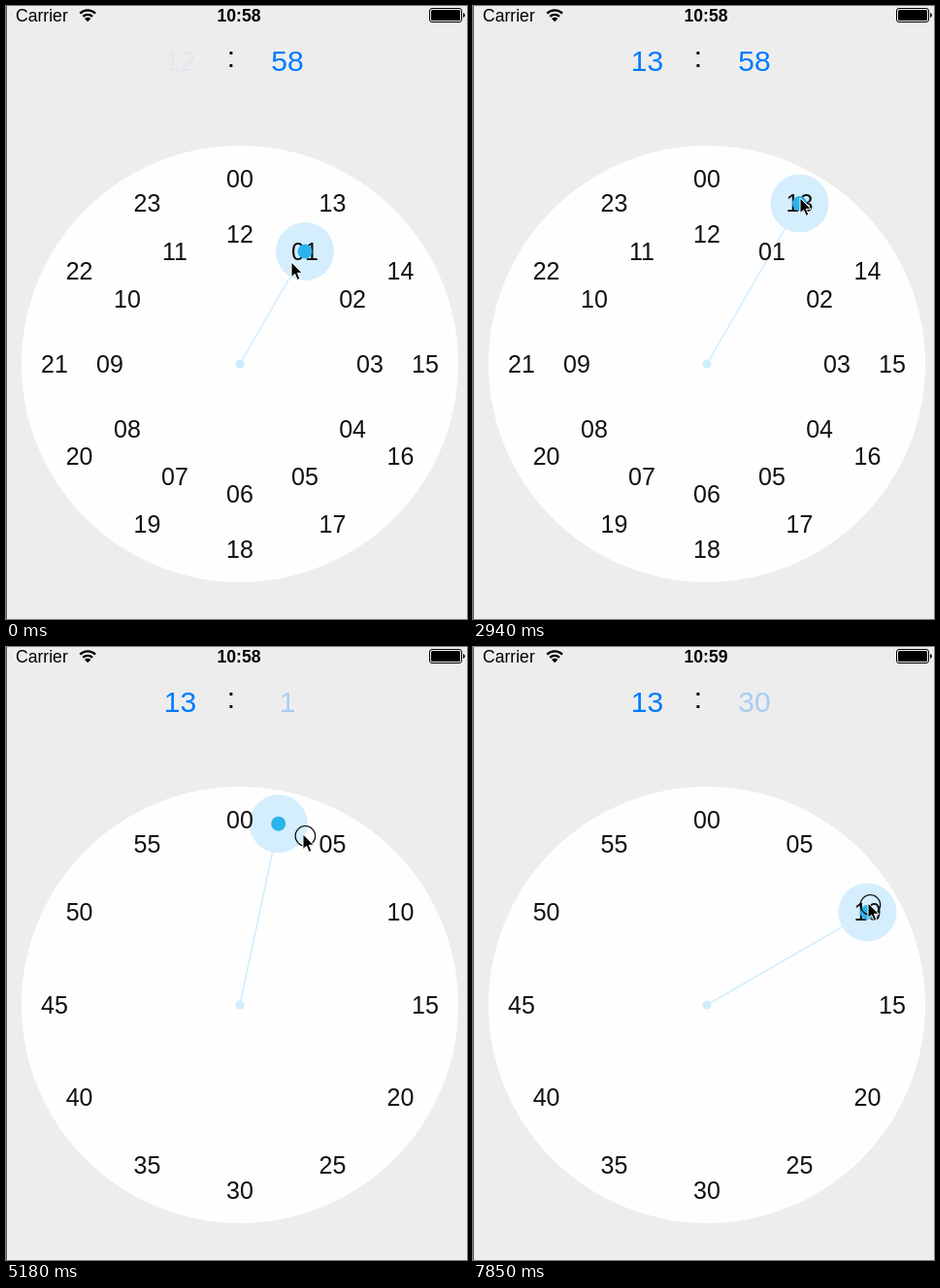
Animation of 475x632 px, one loop 8000 ms. Source, as an HTML page:

```html
<!DOCTYPE html>
<html lang="en">
<head>
<meta charset="utf-8">
<title>Time picker</title>
<style>
  html, body { margin: 0; width: 100%; height: 100%; overflow: hidden; background: #ededed; }
  svg { display: block; width: 100vw; height: 100vh; }
  text { font-family: "Liberation Sans", Arial, sans-serif; text-anchor: middle; }
  .digit { font-size: 25px; fill: #111; }
  .title { font-size: 30px; }
  .blue { fill: #007aff; }
  .status { font-size: 17.6px; }
</style>
</head>
<body>
<svg id="stage" viewBox="0 0 475 632">
  <rect width="475" height="632" fill="#ededed"/>
  <rect width="1" height="632" fill="#5a5a5a"/>

  <text class="status" x="10" y="16" style="text-anchor:start" textRendering="auto">Carrier</text>
  <g fill="none" stroke="#000" stroke-width="2.3">
    <path d="M76.3 7.6A11.3 11.3 0 0 1 92.1 7.6"/>
    <path d="M79.3 10.9A7 7 0 0 1 89.1 10.9"/>
  </g>
  <path d="M84.2 16.2L81 13A4.6 4.6 0 0 1 87.4 13Z"/>
  <text id="clock" class="status" x="240" y="16" font-weight="bold"></text>
  <rect x="436.5" y="2.5" width="33" height="14" rx="2.5" fill="none" stroke="#000"/>
  <rect x="438" y="4" width="30" height="11" rx="1.5"/>
  <path d="M471 7a2.6 2.6 0 0 1 0 5z"/>

  <text id="hour" class="title blue" x="179.5" y="66.5"></text>
  <text class="title" x="232" y="63">:</text>
  <text id="minute" class="title blue" x="290" y="66.5"></text>

  <circle cx="241" cy="369" r="225" fill="#fefefe"/>
  <g id="dials"></g>

  <g id="pointer">
    <circle id="press" cx="2.4" cy="1.8" r="10.3" fill="none" stroke="#000" stroke-width="1.1"/>
    <path d="M0 0V15.6L3.6 12.3L6.2 18.4L8.9 17.2L6.3 11.3H11.2Z" stroke="#fff" stroke-width="1"/>
  </g>
</svg>
<script>
  const NS = "http://www.w3.org/2000/svg";
  const CX = 241, CY = 369, OUTER = 191, INNER = 134;
  const LOOP = 8000, LAST_TICK = 53;
  const $ = id => document.getElementById(id);
  const pad = n => String(n).padStart(2, "0");

  // [tick, value]
  const hourPicks = [[-9, 12], [-1, 1], [5, 2], [13, 14], [17, 13]];
  const minutePicks = [[-9, 58], [29, 0], [33, 1], [35, 2], [36, 6], [37, 11],
    [38, 15], [39, 20], [40, 26], [41, 30], [53, 10]];
  // [tick, x, y] of the pointer tip
  const route = [[0, 294, 264], [2, 318, 275], [3, 318, 275], [5, 344, 302], [9, 344, 302],
    [12, 404, 275], [15, 404, 275], [17, 344, 216], [20, 337, 198], [22, 338, 205],
    [26, 338, 205], [29, 250, 180], [32, 250, 180], [35, 306, 193], [36, 367, 230],
    [37, 419, 303], [38, 432, 376], [39, 396, 478], [40, 306, 543], [41, 247, 553],
    [42, 245, 550], [46, 245, 550], [52, 407, 264], [53, 407, 264]];

  function add(parent, tag, attrs, text) {
    const el = document.createElementNS(NS, tag);
    for (const key in attrs) el.setAttribute(key, attrs[key]);
    if (text !== undefined) el.textContent = text;
    return parent.appendChild(el);
  }

  function set(el, attrs) {
    for (const key in attrs) el.setAttribute(key, attrs[key]);
  }

  function polar(turn, radius) {
    const a = turn * Math.PI * 2;
    return [CX + radius * Math.sin(a), CY - radius * Math.cos(a)];
  }

  const hourSpot = h => polar(h / 12, h === 0 || h > 12 ? OUTER : INNER);
  const minuteSpot = m => polar(m / 60, OUTER);

  function makeDial(values, spot) {
    const g = add($("dials"), "g", {});
    const line = add(g, "line", { x1: CX, y1: CY, stroke: "#d4eefe", "stroke-width": 1.6 });
    const bubble = add(g, "circle", { r: 30, fill: "#d4eefe" });
    for (const v of values) {
      const [x, y] = spot(v);
      add(g, "text", { class: "digit", x, y: y + 8.6 }, pad(v));
    }
    const dot = add(g, "circle", { r: 7.5, fill: "#2ab3ec" });
    add(g, "circle", { cx: CX, cy: CY, r: 4.5, fill: "#cdecfe" });
    return {
      point(v) {
        const [x, y] = spot(v);
        set(line, { x2: x, y2: y });
        set(bubble, { cx: x, cy: y });
        set(dot, { cx: x, cy: y });
      },
      show(opacity, scale) {
        set(g, {
          opacity,
          visibility: opacity > 0 ? "visible" : "hidden",
          transform: `translate(${CX} ${CY}) scale(${scale}) translate(${-CX} ${-CY})`
        });
      }
    };
  }

  const hours = makeDial([...Array(24).keys()], hourSpot);
  const minutes = makeDial([...Array(12).keys()].map(i => i * 5), minuteSpot);

  // The screen refreshes in steps, slightly slower in the second part.
  function tickAt(t) {
    const n = t < 2940 ? Math.floor((t + 8) / 147) : 20 + Math.floor((t - 2932) / 149);
    return Math.min(n, LAST_TICK);
  }

  function lastIndex(list, n) {
    let i = 0;
    while (i + 1 < list.length && list[i + 1][0] <= n) i++;
    return i;
  }

  // The old title fades out, then the new one fades in.
  function drawTitle(el, picks, n) {
    const i = lastIndex(picks, n);
    const age = n - picks[i][0];
    const shown = age < 2 ? picks[i - 1][1] : picks[i][1];
    el.textContent = shown;
    el.setAttribute("opacity", [0.28, 0.04, 0.5][age] ?? 1);
    return picks[i][1];
  }

  function tipAt(n) {
    const i = lastIndex(route, n);
    const a = route[i], b = route[i + 1] || a;
    const k = b === a ? 0 : (n - a[0]) / (b[0] - a[0]);
    return [a[1] + (b[1] - a[1]) * k, a[2] + (b[2] - a[2]) * k];
  }

  function draw(t) {
    const n = tickAt(t);
    $("clock").textContent = n < 42 ? "10:58" : "10:59";
    hours.point(drawTitle($("hour"), hourPicks, n));
    minutes.point(drawTitle($("minute"), minutePicks, n));

    const swap = Math.max(0, Math.min(1, (n - 22) / 3));
    hours.show(1 - swap, 1 + 0.15 * swap);
    minutes.show(swap, 0.9 + 0.1 * swap);

    const [x, y] = tipAt(n);
    $("pointer").setAttribute("transform", `translate(${x} ${y})`);
    const pressed = [5, 13, 17, 53].includes(n) || (n >= 29 && n <= 42);
    $("press").setAttribute("visibility", pressed ? "visible" : "hidden");
  }

  const start = performance.now();
  function loop() {
    draw((performance.now() - start) % LOOP);
    requestAnimationFrame(loop);
  }
  loop();
</script>
</body>
</html>
```
